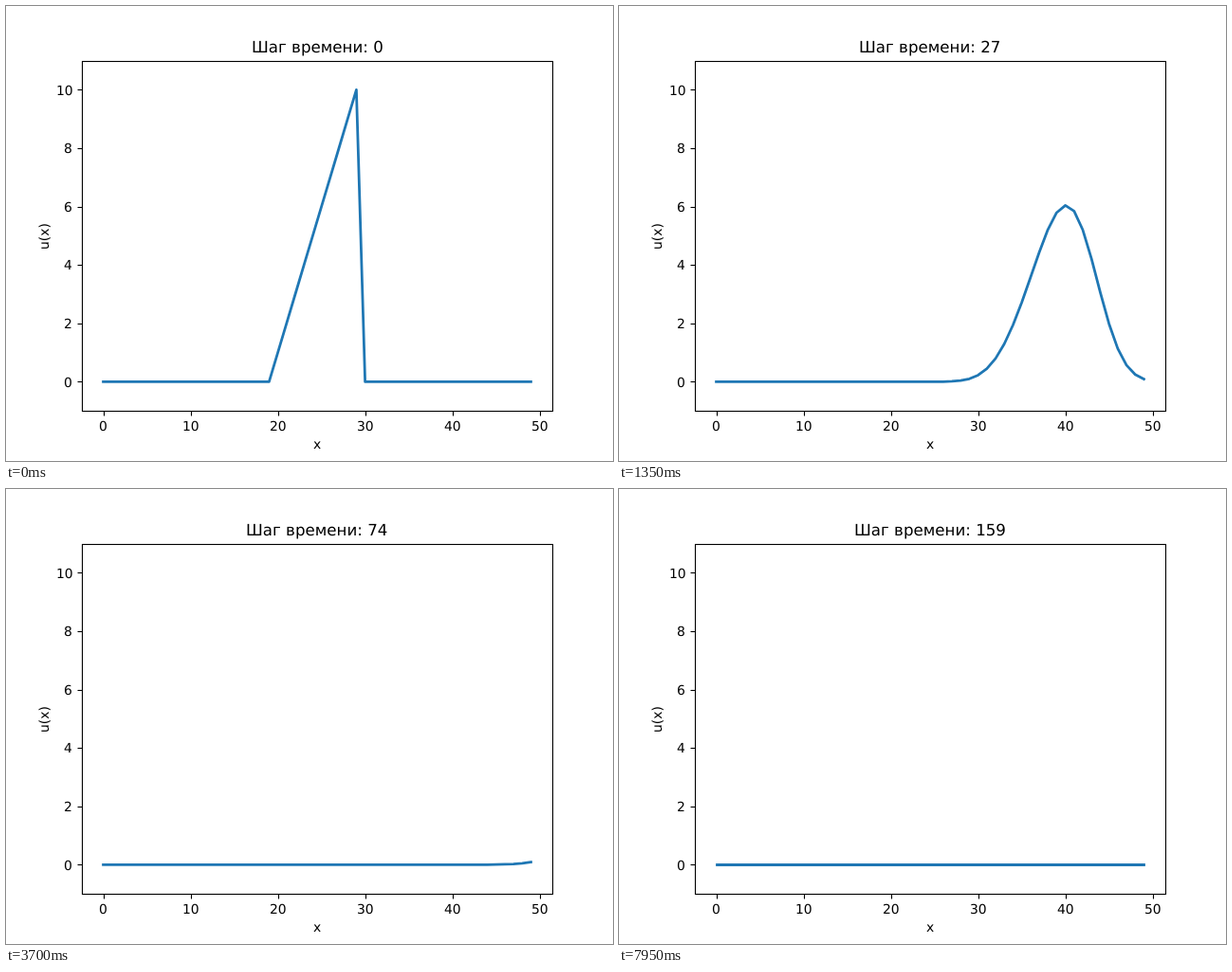
An HTML page with a canvas that plays this animation: 640x480 px, repeating every 8 s.

```html
<!DOCTYPE html>
<html lang="ru">
<head>
<meta charset="utf-8">
<title>u(x)</title>
<style>
  html, body { margin: 0; width: 100%; height: 100%; overflow: hidden; background: #fff; }
  canvas { display: block; }
</style>
</head>
<body>
<canvas id="plot" width="640" height="480"></canvas>
<script>
const ctx = document.getElementById('plot').getContext('2d');
const STEP_MS = 50, STEPS = 160, POINTS = 50, COURANT = 0.5;
const POINT = 100 / 72; // pixels per typographic point
const LEFT = 80, RIGHT = 576, TOP = 57.6, BOTTOM = 427.2;
const UNIT_X = (RIGHT - LEFT) / 1.1 / (POINTS - 1);
const UNIT_Y = (BOTTOM - TOP) / 12;

const toX = x => LEFT + (RIGHT - LEFT) / 22 + x * UNIT_X;
const toY = u => BOTTOM - (u + 1) * UNIT_Y;
const snap = v => Math.floor(v + 0.5) + 0.5;

// Upwind advection of a sawtooth pulse
const states = [Array.from({ length: POINTS }, (_, i) => i > 19 && i < 30 ? i - 19 : 0)];
while (states.length < STEPS) {
  const previous = states[states.length - 1];
  states.push(previous.map((u, i) => i ? u - COURANT * (u - previous[i - 1]) : 0));
}

function text(string, x, baseline, points = 10, align = 0.5) {
  ctx.font = `${points * POINT}px "DejaVu Sans", sans-serif`;
  ctx.fillText(string, Math.round(x - ctx.measureText(string).width * align), baseline);
}

function segment(x1, y1, x2, y2) {
  ctx.beginPath();
  ctx.moveTo(x1, y1);
  ctx.lineTo(x2, y2);
  ctx.stroke();
}

function drawAxes() {
  ctx.fillStyle = ctx.strokeStyle = '#000';
  ctx.lineWidth = 0.8 * POINT;
  ctx.lineCap = 'butt';
  ctx.lineJoin = 'miter';
  ctx.strokeRect(snap(LEFT), snap(TOP), RIGHT - LEFT, snap(BOTTOM) - snap(TOP));
  for (let x = 0; x <= 50; x += 10) {
    segment(snap(toX(x)), 427.5, snap(toX(x)), 432.5);
    text(x, toX(x), 448);
  }
  for (let u = 0; u <= 10; u += 2) {
    segment(75.5, snap(toY(u)), 80.5, snap(toY(u)));
    text(u, 70.28, Math.round(toY(u) + 5.25), 10, 1);
  }
  text('x', 328, 467);
  ctx.save();
  ctx.translate(45, 243);
  ctx.rotate(-Math.PI / 2);
  text('u(x)', 0, 0);
  ctx.restore();
}

function drawCurve(values) {
  // A practically flat line is aligned to the pixel grid
  const flat = values.every((u, i) => !i || Math.abs(u - values[i - 1]) * UNIT_Y < 1e-4);
  const align = flat ? snap : v => v;
  ctx.strokeStyle = '#1f77b4';
  ctx.lineWidth = 2 * POINT;
  ctx.lineCap = 'square';
  ctx.lineJoin = 'round';
  ctx.beginPath();
  values.forEach((u, i) => ctx.lineTo(align(toX(i)), align(toY(u))));
  ctx.stroke();
}

let shown = -1;
function render() {
  const step = Math.floor(performance.now() / STEP_MS) % STEPS;
  if (step !== shown) {
    shown = step;
    ctx.fillStyle = '#fff';
    ctx.fillRect(0, 0, 640, 480);
    ctx.textRendering = 'geometricPrecision';
    drawCurve(states[step]);
    drawAxes();
    text(`Шаг времени: ${step}`, 328, 49, 12);
  }
  requestAnimationFrame(render);
}
render();
</script>
</body>
</html>
```
